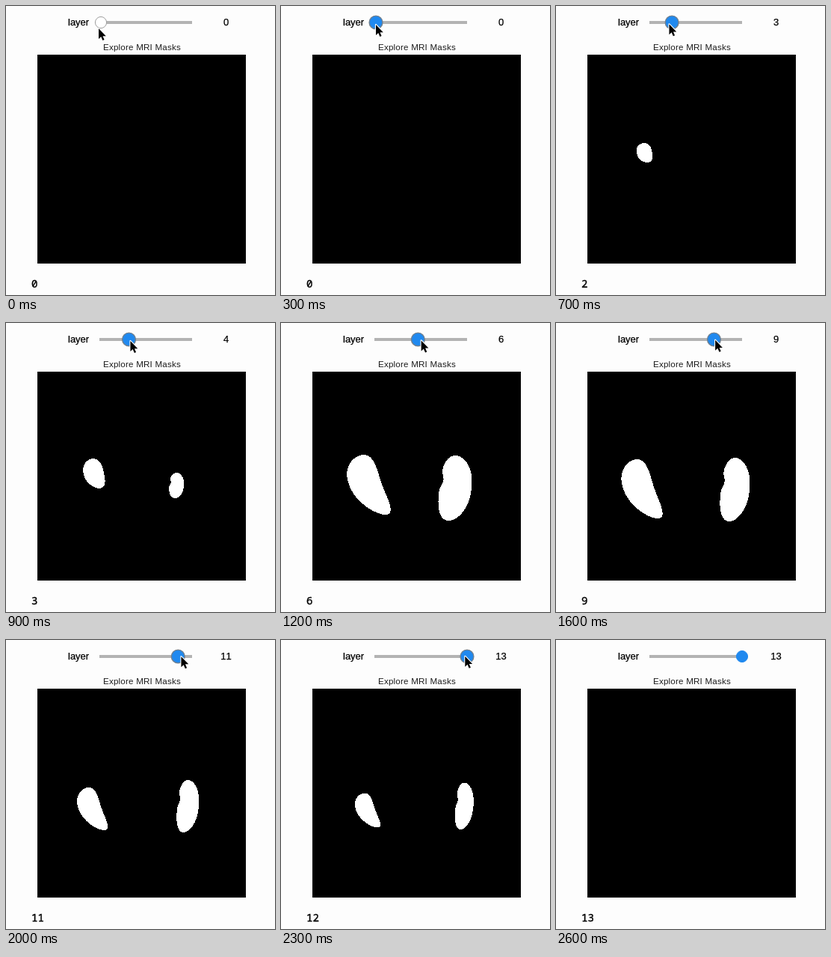
Animation, 360 px wide and 386 px high, one loop 3.4 s. Source, as an HTML page:

```html
<!DOCTYPE html>
<html lang="en">
<head>
<meta charset="utf-8">
<title>Mask explorer</title>
<style>
  html, body { margin: 0; width: 100%; height: 100%; overflow: hidden; background: #fdfdfd; }
  svg { display: block; width: 360px; height: 386px; }
  text { font: 13px "Liberation Sans", Arial, sans-serif; font-kerning: none; stroke: #000; stroke-width: .25px; }
  .title { font-size: 11.6px; letter-spacing: .2px; fill: #1c1c1c; stroke: none; }
  .out { font: 14px "Noto Sans Mono", monospace; stroke-width: .4px; }
</style>
</head>
<body>
<svg viewBox="0 0 360 386">
  <text x="83" y="26">layer</text>
  <rect x="125" y="20" width="124" height="4" fill="#b3b3b3"/>
  <circle id="knob" cy="22"/>
  <text id="value" x="294.5" y="26" text-anchor="middle"></text>
  <text class="title" x="130" y="59">Explore MRI Masks</text>
  <rect x="42" y="65" width="279" height="279"/>
  <path id="masks" fill="#fff" shape-rendering="crispEdges"/>
  <text id="out" class="out" x="34" y="376"></text>
  <path id="cursor" d="M0 0V14L3.2 11L5.4 16L7.6 15L5.5 10.2H9.8Z"
        stroke="#fff" stroke-width="2.2" paint-order="stroke" stroke-linejoin="round"/>
</svg>
<script>
const LOOP = 3400, STEP = 100, LAST = 26;
const MAX = 13, TRACK = { x: 127, width: 122 };
const PRESS = 2, RELEASE = 25;
const $ = id => document.getElementById(id);
const clamp = (v, lo, hi) => Math.min(hi, Math.max(lo, v));
const mix = (a, b, k) => a + (b - a) * k;
const sliderX = v => TRACK.x + v / MAX * TRACK.width;

// the drag slows down towards the end of the track
function dragAt(step) {
  const u = clamp((step - 3.9) / 20.3, 0, 1);
  return MAX * (1 - (1 - u) ** 1.35);
}
const valueAt = step => Math.round(dragAt(step));

// each mask is a bent oval; its box [x, y, w, h] is keyed on a few layers
const masks = [
  {
    shift: -.09, lean: .27, bend: .22, dent: 0,
    boxes: { 2: [108, 183, 22, 26], 6: [91, 176, 54, 80], 9: [90, 182, 51, 79], 11: [97, 197, 38, 57] }
  },
  {
    shift: .02, lean: -.1, bend: -.1, dent: .1,
    boxes: { 3: [218, 200, 20, 34], 6: [210, 177, 45, 87], 9: [219, 180, 40, 85], 11: [228, 187, 30, 70] }
  }
];

function boxAt(boxes, layer) {
  const keys = Object.keys(boxes).map(Number);
  const i = keys.findIndex(k => k >= layer);
  const hi = i < 0 ? keys.length - 1 : Math.max(1, i);
  const [a, b] = [keys[hi - 1], keys[hi]];
  return boxes[a].map((n, j) => mix(n, boxes[b][j], (layer - a) / (b - a)));
}

function outline({ shift, lean, bend, dent, boxes }, layer) {
  if (layer < Object.keys(boxes)[0] || layer >= MAX) return '';
  const [x, y, w, h] = boxAt(boxes, layer);
  const grown = Math.min(1, layer / 6);
  const points = [];
  for (let a = 0; a < 360; a += 5) {
    const s = -Math.cos(a * Math.PI / 180);
    const side = a < 180 ? 1 : -1;
    const half = (.5 - Math.abs(shift) * grown) * Math.sqrt(Math.max(0, 1 - Math.abs(s) ** 2.4));
    const mid = .5 + grown * (shift + lean * s + bend * s * s);
    const notch = side < 0 ? dent * Math.exp(-(((s + .25) / .2) ** 2)) : 0;
    points.push([x + w * (mid + side * half + notch), y + h * (s + 1) / 2]);
  }
  return `M${points.join('L')}Z`;
}

function cursorAt(step) {
  const v = dragAt(step);
  const approach = Math.max(0, 1 - step / PRESS);
  const leave = Math.max(0, step - RELEASE + 1);
  return [sliderX(v) - 3 * approach + 7 * leave, 25 - v / 4 + 5 * approach + 11 * leave];
}

function setAll(el, attrs) {
  for (const name in attrs) el.setAttribute(name, attrs[name]);
}

function draw(ms) {
  const step = Math.min(LAST, Math.floor(ms / STEP));
  const value = valueAt(step);
  const shown = valueAt(step - 1); // the picture trails the slider
  const held = step >= PRESS && step < RELEASE;
  setAll($('knob'), {
    cx: sliderX(value),
    r: held ? 8.9 : 7.6,
    fill: step < PRESS ? '#fff' : '#2089ef',
    stroke: held ? '#71808f' : step < PRESS ? '#9e9e9e' : '#2089ef',
    'stroke-width': held ? 1.4 : 1
  });
  $('value').textContent = value;
  $('out').textContent = shown;
  $('masks').setAttribute('d', masks.map(m => outline(m, shown)).join(''));
  setAll($('cursor'), {
    transform: `translate(${cursorAt(step)})`,
    visibility: step < LAST ? 'visible' : 'hidden'
  });
}

const start = performance.now();
function tick() {
  draw((performance.now() - start) % LOOP);
  requestAnimationFrame(tick);
}
tick();
</script>
</body>
</html>
```
